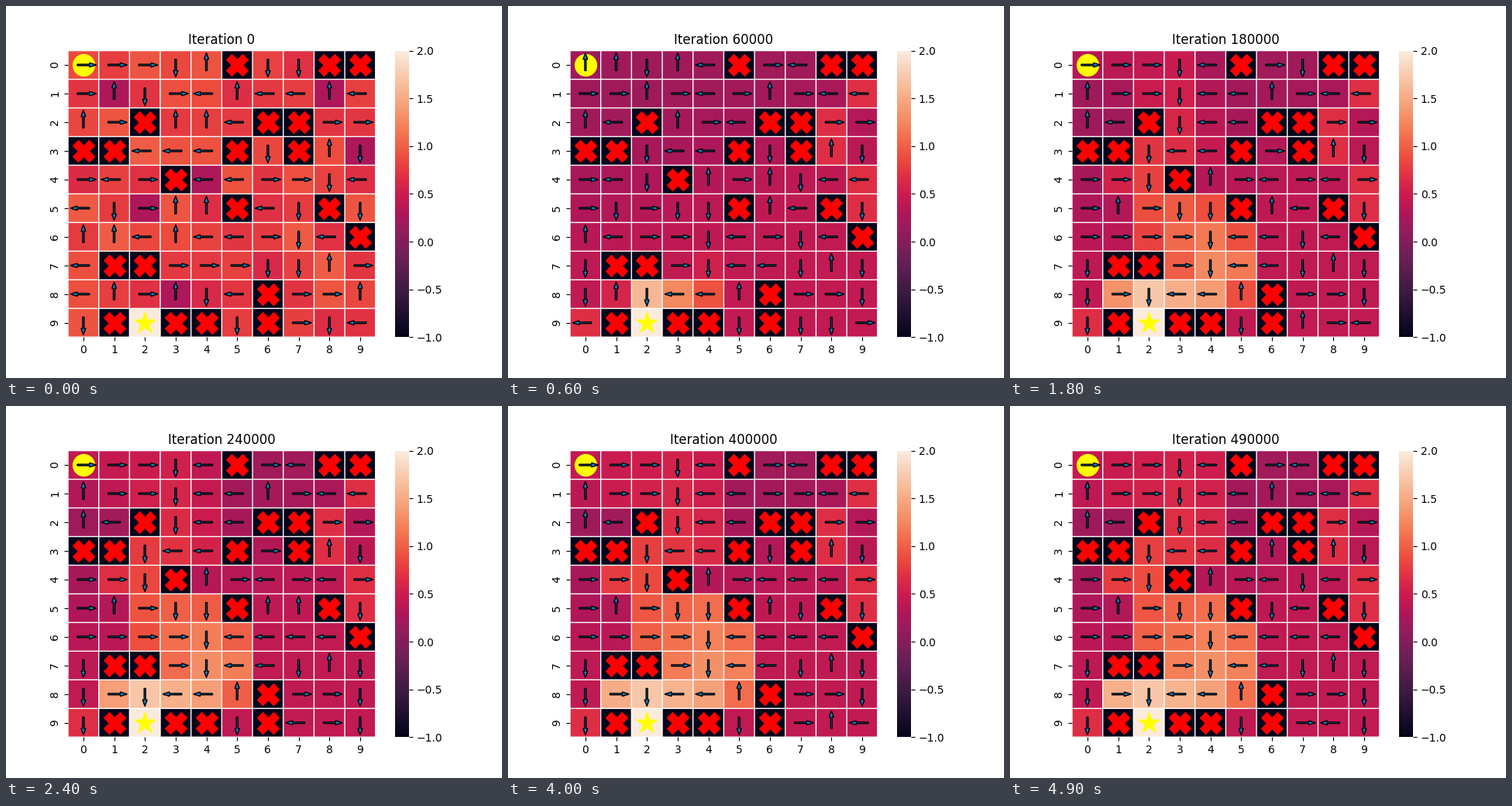
Animation, 640 px wide and 480 px high, one loop 5000 ms. Source, as a matplotlib script:

```python
import numpy as np
import matplotlib.pyplot as plt
from matplotlib.animation import FuncAnimation
from matplotlib.collections import PolyCollection
from matplotlib.colors import LinearSegmentedColormap

N, FRAMES = 10, 50
EARLY_END, ROUTE_FOUND = 6, 18
GOAL = (9, 2)
STEP = {">": (0, 1), "<": (0, -1), "^": (-1, 0), "v": (1, 0)}
ROUTE = dict(zip("RLUD", "><^v"))

# Greedy moves; x is a wall, letters are moves on the learned route.
INITIAL = """
>>>v^xvvxx
>^v><^<<^<
^>x^^<xx>>
xx<<<xvx^v
><>x<<>>v<
<v>^^x<vxv
^^<^<<>v<x
<xx>>>vv^>
<^>^v<x>>^
vx*xxvx>v<""".split()
EARLY = """
^^v^<x><xx
>>^><>^><<
^<x^><xx>>
xxv<<xvx^v
><vx^>^v<<
>v>vvx^<xv
^<>>v<>v<x
vxx>v<<v^v
v^v<<^x>>v
<x*xxvxvv>""".split()
SETTLED = """
RRRDLx><xx
URRDL<^><<
^<xDL<xx>>
xxDLLxvx^v
>RDx^><><>
>^RDDx^<xv
>>RRDL<<<x
vxxRDL<v^v
vRDLLUx>>v
vx*xxvx>>v""".split()

CELLS = [(r, c) for r in range(N) for c in range(N)]
WALLS = [(r, c) for r, c in CELLS if SETTLED[r][c] == "x"]
OPEN = [cell for cell in CELLS if cell not in WALLS and cell != GOAL]
ON_ROUTE = [(r, c) for r, c in CELLS if SETTLED[r][c] in ROUTE]


def settled(cell):
    mark = SETTLED[cell[0]][cell[1]]
    return ROUTE.get(mark, mark)


def follow(cell):
    dr, dc = STEP[settled(cell)]
    return cell[0] + dr, cell[1] + dc


def distance(cell):
    return 0 if cell == GOAL else 1 + distance(follow(cell))


DIST = {cell: distance(cell) for cell in ON_ROUTE}
SIDE_ENDS = set(ON_ROUTE) - {follow(cell) for cell in ON_ROUTE}

rng = np.random.default_rng(1)
SWITCH = rng.random((N, N))
START = .62 + .36 * rng.random((N, N))
for cell in [(1, 1), (1, 8), (3, 9), (4, 4), (5, 2), (8, 3)]:
    START[cell] = .3

# Off the route, values rise towards the lower right; a few pockets stay warm.
rows, cols = np.indices((N, N))
BASE = .18 + .25 / (1 + np.exp(5 - rows - .4 * cols))
for cell in [(1, 9), (2, 8), (3, 8), (4, 9), (5, 9), (9, 0)]:
    BASE[cell] = .67


def progress(cell, frame):
    """Share of the final value that has spread back from the goal."""
    d = DIST[cell]
    side = cell in SIDE_ENDS
    arrival = .6 * (d - 1) + 5.5 * (1 - np.exp((1 - d) / 2.5)) + 3 * side
    t = max(0, frame - arrival)
    tail = .5 if side else .18 * (1 - 1 / d)
    return 1 - (1 - tail) * np.exp(-t / 2.4) - tail * np.exp(-t / 14)


def values_at(frame):
    values = BASE + (START - BASE) * np.exp(-frame / 1.2)
    for cell, d in DIST.items():
        values[cell] += (1.7 * .92 ** (d - 1) - BASE[cell]) * progress(cell, frame)
    for cell in WALLS:
        values[cell] = -1
    values[GOAL] = 2
    return values


def is_fickle(r, c):
    return c == 7 or (c == 6 and r < 6) or (r == 9 and c > 6)


def moves_at(frame):
    noise = np.random.default_rng(frame)
    if frame < EARLY_END:
        blend = (frame / EARLY_END) ** .4
    else:
        blend = min(1, (frame - EARLY_END) / (ROUTE_FOUND - EARLY_END))
    moves = {}
    for r, c in OPEN:
        wobble, other = noise.random(), noise.choice(list(STEP))
        switched = blend > SWITCH[r, c]
        if frame < EARLY_END:
            move = EARLY[r][c] if switched else INITIAL[r][c]
        else:
            move = settled((r, c)) if switched else EARLY[r][c]
        if frame > EARLY_END and is_fickle(r, c) and wobble < .35:
            move = other
        moves[r, c] = move
    return moves


ARROW = np.array([(-.2, -.025), (.2, -.025), (.2, -.075), (.425, 0),
                  (.2, .075), (.2, .025), (-.2, .025)])


def arrow(cell, move):
    dy, dx = STEP[move]
    turn = np.array([[dx, dy], [-dy, dx]])
    return ARROW @ turn + (cell[1] + .5, cell[0] + .5)


def arrows_at(frame):
    return [arrow(cell, move) for cell, move in moves_at(frame).items()]


ROCKET = LinearSegmentedColormap.from_list("rocket", [
    (0, "#03051a"), (1 / 7, "#36193e"), (.25, "#611f53"), (2 / 7, "#701f57"),
    (.375, "#961c5b"), (3 / 7, "#ad1759"), (.5, "#cb1b4f"), (4 / 7, "#e13342"),
    (.625, "#ec4c3e"), (5 / 7, "#f37651"), (.75, "#f4875e"),
    (6 / 7, "#f6b48f"), (1, "#faebdd")])

fig, ax = plt.subplots(figsize=(6.4, 4.8), dpi=100)
mesh = ax.pcolormesh(values_at(0), cmap=ROCKET, vmin=-1, vmax=2)
edges = np.arange(N + 1)
for draw_lines in (ax.hlines, ax.vlines):
    draw_lines(edges, 0, N, color="white", linewidth=1, snap=False, zorder=1)
ax.set(xlim=(0, N), ylim=(N, 0))
ax.set_xticks(edges[:-1] + .5, range(N))
ax.set_yticks(edges[:-1] + .5, range(N), rotation=90, va="center")
ax.spines[:].set_visible(False)
bar = fig.colorbar(mesh, ax=ax)
bar.outline.set_linewidth(0)


def mark(cells, marker, color):
    y, x = np.array(cells).T + .5
    ax.scatter(x, y, s=400, marker=marker, color=color, zorder=2)


mark(WALLS, "X", "red")
mark([(0, 0)], "o", "yellow")
mark([GOAL], "*", "yellow")
arrows = PolyCollection(arrows_at(0), facecolor="C0", edgecolor="black",
                        linewidth=1, joinstyle="miter", zorder=3)
ax.add_collection(arrows, autolim=False)
title = ax.set_title("Iteration 0")


def update(frame):
    mesh.set_array(values_at(frame))
    arrows.set_verts(arrows_at(frame))
    title.set_text(f"Iteration {frame * 10000}")
    return mesh, arrows, title


animation = FuncAnimation(fig, update, frames=FRAMES, interval=100,
                          repeat=True, repeat_delay=0)
plt.show()
```
